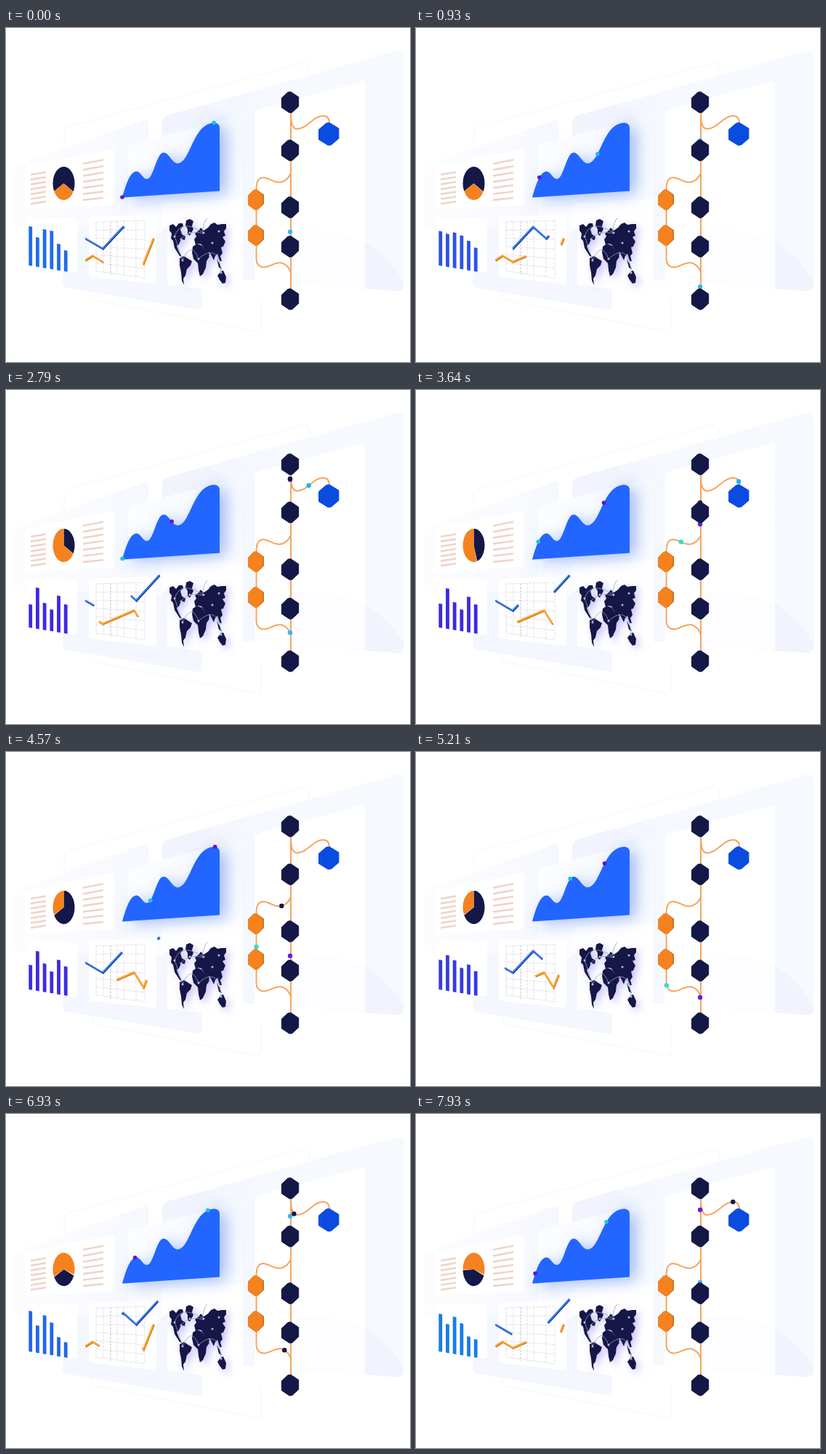
Animation of 556 by 460 pixels, one loop 8 s. Source, as an HTML page:

```html
<!DOCTYPE html>
<html lang="en">
<head>
<meta charset="utf-8">
<title>Dashboard</title>
<style>
html, body { margin: 0; width: 100%; height: 100%; overflow: hidden; background: #fff; }
svg { display: block; width: 556px; height: 460px; }
</style>
</head>
<body>
<svg id="stage" viewBox="0 0 556 460" xmlns="http://www.w3.org/2000/svg">
<defs>
  <linearGradient id="left" x1="0" x2="1">
    <stop offset="0" stop-color="#fdfdfe"/><stop offset="1" stop-color="#f5f8fe"/>
  </linearGradient>
  <linearGradient id="right" x1="0" x2="1">
    <stop offset="0" stop-color="#f2f5fd"/><stop offset=".5" stop-color="#f6f9fe"/><stop offset="1" stop-color="#f6fafe"/>
  </linearGradient>
  <linearGradient id="card" x1="0" x2="1" y1="1" y2="0">
    <stop offset="0" stop-color="#fff"/><stop offset="1" stop-color="#f6f9fe"/>
  </linearGradient>
  <filter id="glow" x="-40%" y="-40%" width="190%" height="190%">
    <feDropShadow dx="9" dy="4" stdDeviation="11" flood-color="#4a7cf0" flood-opacity=".52"/>
  </filter>
  <filter id="haze" x="-30%" y="-30%" width="160%" height="160%">
    <feDropShadow dx="4" dy="4" stdDeviation="5.500" flood-color="#8a80f0" flood-opacity=".5"/>
  </filter>
  <clipPath id="rightClip"><path d="M215 131Q215 123 223 120L536 31.500Q548 29 548 42V350Q548 364 534 362L326 346V150L215 160Z"/></clipPath>
</defs>

<g id="panels">
  <path fill="none" stroke="#f5f6f9" d="M80 190V144Q80 138 86 136L406 49Q417 46 417 57V85M119 345V370Q119 374 124 375L345 418Q351 419 351 413V374"/>
  <path fill="url(#left)" d="M11 200Q11 191 20 187L190 127Q196 125 196 132V283L18 277Q11 277 11 270Z"/>
  <path fill="#f4f7fd" d="M78 277H222V353L270 360V382Q270 389 263 388L84 358Q78 357 78 350Z"/>
  <path fill="url(#right)" d="M215 131Q215 123 223 120L536 31.500Q548 29 548 42V350Q548 364 534 362L326 346V230L215 240Z"/>
  <g clip-path="url(#rightClip)">
    <path fill="#f1f4fd" d="M215 123L270 105Q305 112 319 150L322 175L215 190Z"/>
    <path fill="#f1f4fd" d="M390 278Q470 274 505 302Q535 324 548 354V365H390Z"/>
  </g>
  <path fill="#fff" d="M342 121Q342 114 348 112L488 74Q494 72 494 79V360L342 347Z"/>
  <path fill="#fdfdff" d="M393 278Q455 275 494 296V360L393 351Z"/>
  <path fill="#fff" d="M26 196Q26 191 31 190L144 167Q149 166 149 171V239Q149 244 144 244L31 250Q26 250 26 245Z"/>
  <path fill="url(#card)" d="M168 167Q168 161 174 159L319 122Q326 120 326 127V229Q326 235 320 235L174 243Q168 243 168 237Z"/>
  <path fill="#fbfcff" d="M168 243L215 241V282H168Z"/>
  <path fill="#fff" d="M28 265Q28 261 32 261L94 262Q98 262 98 267V332Q98 337 93 337L33 331Q28 330 28 326Z"/>
  <path fill="#fff" d="M114 264Q114 260 118 260L202 257Q207 257 207 262V347Q207 352 202 352L119 343Q114 342 114 338Z"/>
  <path fill="#fff" d="M222 260Q222 255 227 255L320 253Q326 253 326 258V358L227 354Q222 354 222 349Z"/>
</g>

<path id="lists" fill="none" stroke="#efd4ca" stroke-width="2.700"/>
<ellipse cx="79.500" cy="214" rx="15.500" ry="23.500" fill="#fff"/>
<path id="pieA" fill="#131847"/>
<path id="pieB" fill="#f5821f"/>

<path id="area" fill="#2266ff" filter="url(#glow)" d="M160 233.500C164 219 170 198.500 179 197.500C185 196.500 188 208 194 208C203 208 207 171.500 217 171.500C224 171.500 229 186.500 236 186.500C254 186.500 257 130.500 287 130.500Q294 131 294 138V224.500Z"/>
<path id="ridge" fill="none" d="M160 233C164 219 170 198.500 179 197.500C185 196.500 188 208 194 208C203 208 207 171.500 217 171.500C224 171.500 229 186.500 236 186.500C254 186.500 257 130.500 287 130.500Q292 131 293.500 134"/>

<g id="bars"></g>

<path id="grid" fill="none" stroke="#dadae5" stroke-width=".8" stroke-dasharray="4 1.200"/>
<path fill="none" stroke="#b0b0c8" stroke-width=".8" stroke-dasharray="3 1.500" d="M144 266.500V340"/>
<g id="lines" fill="none" stroke-linejoin="miter">
  <g id="orange" transform="translate(0 -.8)">
    <path stroke="#c9780f" stroke-width="2.400" transform="translate(.7 1)" d="M109 320.500L119 314L133 322.500L176 304L189 325L203 290"/>
    <path stroke="#ffa534" stroke-width="2.200" d="M109 320.500L119 314L133 322.500L176 304L189 325L203 290"/>
  </g>
  <g id="blue">
    <path stroke="#173a80" stroke-width="2.400" transform="translate(.7 1)" d="M109 289.500L133 303.500L161 273.500L179 289.500L211 254.500"/>
    <path stroke="#3a80f2" stroke-width="2" d="M109 289.500L133 303.500L161 273.500L179 289.500L211 254.500"/>
  </g>
</g>

<g id="map">
  <g fill="#131847" filter="url(#haze)">
    <path d="M225 272L230 270L234 274L238 269L243 269L244 273L240 277L242 284L247 287L246 292L241 291L238 298L235 300L238 308L242 315L239 314L232 303L230 293L227 290L228 283L225 279Z"/>
    <path d="M248 265L253 263L258 266L256 273L258 277L253 286L250 284L250 277L247 272Z"/>
    <path d="M239 317L245 314L251 318L256 321L254 327L249 332L247 341L244 345L245 354L242 348L241 337L239 327Z"/>
    <path d="M259 291L262 287L260 283L265 279L268 275L272 279L278 275L282 270L287 268L291 271L297 270L303 270L303 276L300 280L302 286L298 288L302 294L299 301L296 302L298 310L295 314L297 321L294 321L291 311L288 314L286 320L282 312L279 308L280 313L276 315L273 305L269 298L264 297L261 299Z"/>
    <path d="M257 301L263 297L270 300L275 308L280 315L276 321L275 330L271 339L267 342L265 334L264 324L258 318L256 309Z"/>
    <path d="M290 318L294 325L297 332L293 330Z"/>
    <path d="M291 341L296 335L299 334L303 343L302 351L298 352L294 347Z"/>
  </g>
  <path fill="none" stroke="#8fa5c0" stroke-width=".8" d="M232 287Q240 262 270 281M240 291Q252 277 272 283M243 320Q255 292 265 318M270 281Q273 265 277 262M265 318Q285 300 294 320L296 336M232 287Q236 297 243 320"/>
  <g id="pins" fill="#a9c2e6"></g>
</g>

<g id="net" fill="none" stroke="#f5a560" stroke-width="2">
  <path d="M392 114V364"/>
  <path d="M392 116C392 134 395 139 401 139C414 139 423 121 436 121C443 121 445 126 445 131"/>
  <path d="M392 200C388 209 381 212.500 376 212.500C368 212.500 361 206 354 206C347 206 344.500 212 344.500 222V318C344.500 326 350 330 356 329.500C364 328.500 371 322 379 323.500C387 325.500 391 333 392 337"/>
</g>
<g fill="none">
  <path id="main" d="M391 112V374"/>
  <path id="spur" d="M391 113V120C392 134 395 139 401 139C414 139 423 121 436 121C443 121 445 126 445 131"/>
  <path id="loop" d="M391 116V200C388 209 381 212.500 376 212.500C368 212.500 361 206 354 206C347 206 344.500 212 344.500 222V318C344.500 326 350 330 356 329.500C364 328.500 371 322 379 323.500C387 325.500 391 333 391 337V374"/>
</g>
<g id="dots"></g>
<g id="hexes"></g>
</svg>
<script>
const LOOP = 8000;
const KEYS = [0, 1710, 2790, 4570, 5860, 6930, 7930];
const $ = id => document.getElementById(id);

function add(parent, tag, attrs) {
  const el = document.createElementNS("http://www.w3.org/2000/svg", tag);
  for (const k in attrs) el.setAttribute(k, attrs[k]);
  return parent.appendChild(el);
}

const clamp = x => Math.min(1, Math.max(0, x));
const ease = x => (1 - Math.cos(Math.PI * clamp(x))) / 2;
const mix = (a, b, k) => a + (b - a) * k;

function keyed(values, t) {
  let i = 0;
  while (i < KEYS.length - 2 && t > KEYS[i + 1]) i++;
  return mix(values[i], values[i + 1], (t - KEYS[i]) / (KEYS[i + 1] - KEYS[i]));
}

// Static repeats
let d = "";
for (let i = 0; i < 7; i++) {
  d += `M34 ${202 + i * 6.7}L55 ${198.5 + i * 6.75}`;
  d += `M106 ${187 + i * 8.3}L134 ${181.5 + i * 8.75}`;
}
$("lists").setAttribute("d", d);

d = "";
for (let i = 0; i < 7; i++) d += `M124 ${267 + i * 11.3}L191 ${265 + i * 13.2}`;
for (const x of [124, 134, 153, 162, 179, 191]) {
  const k = (x - 124) / 67;
  d += `M${x} ${267 - 2 * k}V${335 + 9.5 * k}`;
}
$("grid").setAttribute("d", d);

for (const [x, y] of [[232, 287], [241, 291], [253, 282], [243, 320], [265, 318], [272, 282], [284, 296], [293, 280], [292, 319], [296, 337]])
  add($("pins"), "circle", { cx: x, cy: y, r: 1.5 });

function hex(x, y, w, h, fill, side) {
  const pts = k => [[-1, -.4], [-.25, -.97], [.08, -1], [1, -.5], [1, .4], [.25, .97], [-.08, 1], [-1, .5]]
    .map(([a, b]) => `${x + a * w * k},${y + b * h}`).join(" ");
  if (side) add($("hexes"), "polygon", { points: pts(1), fill: side });
  const face = add($("hexes"), "polygon", { points: pts(side ? .92 : 1), fill, stroke: side ? "none" : fill, "stroke-linejoin": "round" });
  if (side) face.setAttribute("transform", "translate(-.8 0)");
}
for (const y of [102.3, 168.5, 247, 301, 373.5]) hex(391, y, 11.7, 14.4, "#131847");
for (const y of [236.5, 285.5]) hex(344, y, 11, 14.2, "#f5821f", "#d06c18");
hex(444.2, 146, 13.7, 15.4, "#0a4be0");

// Bars
const TOPS = [
  [273, 285, 295, 293, 279, 271, 275],
  [288, 279, 272, 274, 285, 291, 289],
  [277, 285, 293, 291, 282, 277, 279],
  [279, 291, 302, 302, 292, 287, 288],
  [297, 289, 283, 286, 299, 307, 306],
  [306, 299, 295, 295, 308, 314, 310]
];
const BLUENESS = [.82, .25, 0, .03, .42, .74, 1];
const bars = TOPS.map(() => add($("bars"), "path", {}));

function drawBars(t) {
  const k = keyed(BLUENESS, t);
  const fill = `rgb(${mix(63, 24, k)},${mix(40, 124, k)},${mix(226, 236, k)})`;
  bars.forEach((bar, i) => {
    const x = 31.3 + i * 9.7, y = keyed(TOPS[i], t), base = 327 + i * 1.6;
    bar.setAttribute("d", `M${x} ${y}l4.800 .8V${base + .8}l-4.800 -.8Z`);
    bar.setAttribute("fill", fill);
  });
}

// Pie: the two edges of the dark slice advance in turn by a third
function wedge(el, a, b) {
  const p = deg => {
    const r = deg * Math.PI / 180;
    return `${79.5 + 15 * Math.sin(r)} ${214 - 23 * Math.cos(r)}`;
  };
  el.setAttribute("d", `M79.500 214L${p(a)}A15 23 0 ${b - a > 180 ? 1 : 0} 1 ${p(b)}Z`);
}

function drawPie(t) {
  const first = clamp((t - 960) / 1100), second = clamp((t - 5500) / 1300);
  const start = 242 + 118 * ease(first) + 112 * ease(second);
  const end = 479 + 123 * ease((t - 3200) / 1100) + 120 * ease((t - 7600) / 1100);
  const gap = 12 * Math.sin(Math.PI * first) + 4 * second;
  wedge($("pieA"), start, end);
  wedge($("pieB"), end + 2, start + 360 - gap);
}

// Zigzag strokes wrap around their path
const ZIG_START = [-38, 14, 22, 49, 75, 97, 126];
const ZIG_SIZE = [67, 50, 63, 62, 52, 63, 60];

function dash(group, start, size) {
  for (const path of group.children) {
    const len = path.getTotalLength();
    path.setAttribute("stroke-dasharray", `${size} ${len - size}`);
    path.setAttribute("stroke-dashoffset", -start);
  }
}

// Dots
const dot = (fill, r) => add($("dots"), "circle", { r, fill });
const place = (el, path, s) => {
  const p = path.getPointAtLength(s);
  el.setAttribute("cx", p.x);
  el.setAttribute("cy", p.y);
};

const RISE = 4400, FALL = 3000;
const riders = [[0, "#6414d8"], [4600, "#18c3dc"]].map(([shift, fill]) => ({ shift, el: dot(fill, 2.8) }));
const ridge = $("ridge"), ridgeLen = ridge.getTotalLength();

function drawRiders(t) {
  for (const { shift, el } of riders) {
    const u = (t + shift) % (RISE + FALL);
    const k = u < RISE ? (u / RISE) ** 1.3 : 1 - ((u - RISE) / FALL) ** 1.2;
    place(el, ridge, k * ridgeLen);
  }
}

const SKY = "#3db4f0", NAVY = "#131847", VIOLET = "#6a1be0", TEAL = "#35dccb", CYAN = "#14b8f0";
const SPAN = { main: 3880, spur: 2800, loop: 6500 };
const REACH = { main: 262, spur: $("spur").getTotalLength(), loop: 356 };
const trips = [
  ["main", -2300, SKY], ["main", -100, SKY], ["main", 2270, VIOLET],
  ["main", 6096, SKY], ["main", 7240, VIOLET],
  ["loop", 1120, TEAL], ["spur", 1280, CYAN],
  ["spur", 5900, NAVY], ["loop", 2240, NAVY]
].map(([way, start, fill]) => ({ way, start, el: dot(fill, 3.2) }));

function drawTrips(t) {
  for (const { way, start, el } of trips) {
    const x = (t - start) / SPAN[way];
    el.setAttribute("visibility", x > 0 && x < 1 ? "visible" : "hidden");
    place(el, $(way), ease(x) * REACH[way]);
  }
}

function draw(t) {
  drawBars(t);
  drawPie(t);
  dash($("blue"), .0298 * t, 70.5);
  dash($("orange"), keyed(ZIG_START, t), keyed(ZIG_SIZE, t));
  drawRiders(t);
  drawTrips(t);
}

const begin = performance.now();
function tick() {
  draw((performance.now() - begin) % LOOP);
  requestAnimationFrame(tick);
}
tick();
</script>
</body>
</html>
```
